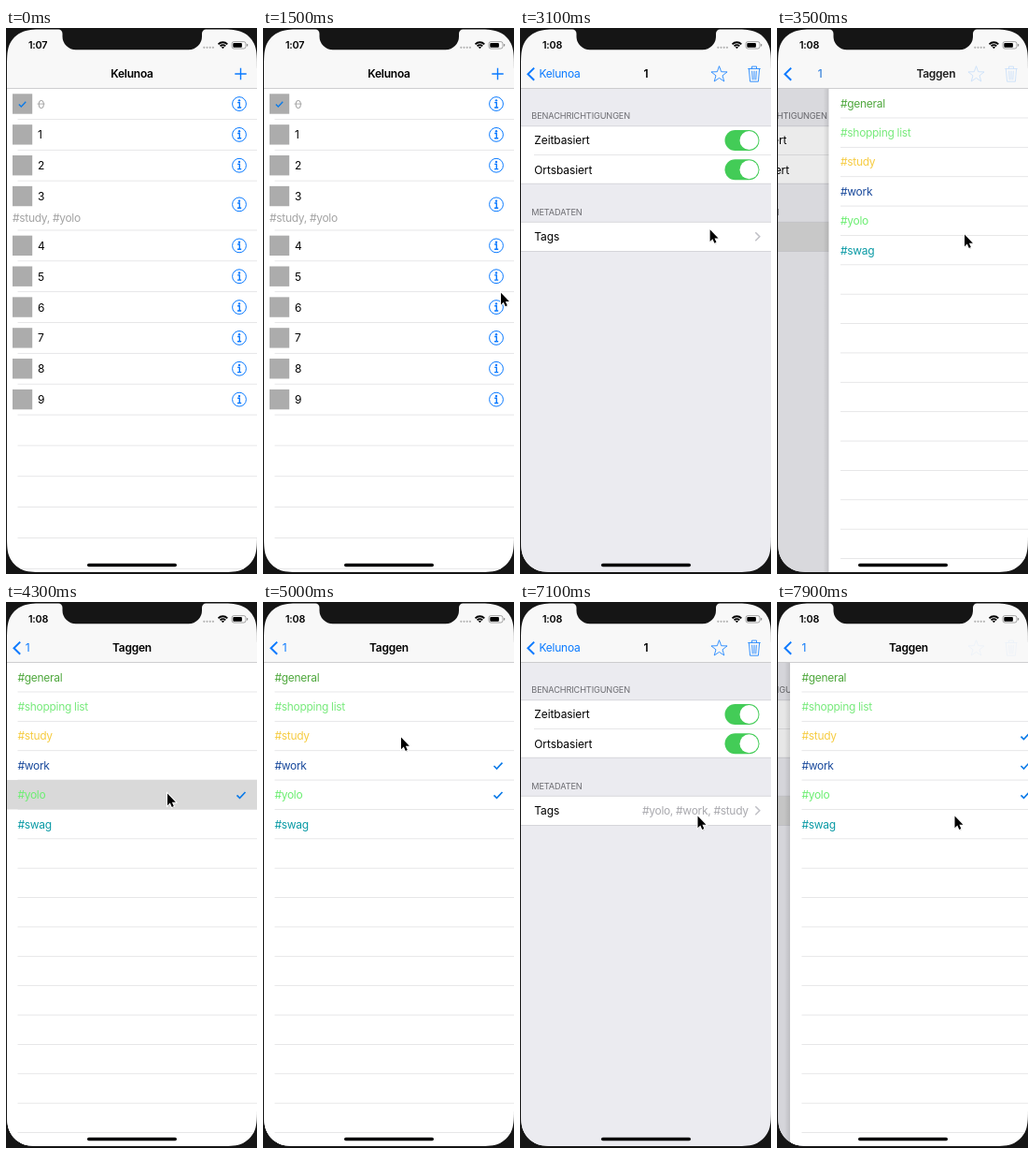
An HTML page that plays this animation: 269 px wide and 583 px high, repeating every 8 s.

```html
<!DOCTYPE html>
<html lang="de">
<head>
<meta charset="utf-8">
<title>Kelunoa</title>
<style>
html, body { margin: 0; width: 100%; height: 100%; overflow: hidden; background: #151515; }
svg { display: block; width: 100vw; height: 100vh; }
text { font: 12px Inter, "Open Sans", sans-serif; letter-spacing: -.25px; white-space: pre; }
.bold { font-weight: 600; }
.mid { text-anchor: middle; }
.end { text-anchor: end; }
.tag { letter-spacing: -.31px; }
.label { letter-spacing: -.1px; }
.head { font-size: 9.2px; letter-spacing: -.14px; fill: #6d6d72; }
.blue { fill: #0a7aff; }
.line { fill: none; stroke: #0a7aff; }
</style>
</head>
<body>
<svg id="stage" viewBox="0 0 269 583"></svg>
<script>
const W = 269, TOP = 64.6, LOOP = 8000, BLUE = '#0a7ae8';
const APP = 'Kelunoa';

const rect = (x, y, w, h, fill, more = '') =>
  `<rect x="${x}" y="${y}" width="${w}" height="${h}" fill="${fill}" ${more}/>`;
const text = (x, y, s, cls = '', more = '') =>
  `<text x="${x}" y="${y}" class="${cls}" ${more}>${s}</text>`;
const rule = (x, y, color = '#e1e1e3') => rect(x, y - .4, W - x, .8, color);
const check = (x, y, size = 1, more = '') =>
  `<path transform="translate(${x} ${y}) scale(${size})" d="M0 .6l3 3 6-6.4" fill="none" stroke="${BLUE}" stroke-width="1.6" ${more}/>`;
const info = y => `<g transform="translate(250 ${y})">
  <circle r="7.4" class="line" stroke-width="1"/>
  <circle cy="-3.7" r="1.2" class="blue"/>
  <path d="M-1.9-1.4H.3V3.8M-2 3.9H2.2" class="line" stroke-width="1.4"/></g>`;

function todoPage() {
  const step = 32.85;
  let out = rect(0, 64, W, 519, '#fff'), y = TOP;
  for (let i = 0; i < 15; i++) {
    const h = i === 3 ? 52.8 : step, c = y + 16.4;
    if (i < 10) {
      out += rect(7, c - 10.7, 21.2, 21.4, '#acacac');
      out += text(34, c + 4.5, i, '', i ? '' : 'fill="#a6a6a6"');
      out += info(y + h / 2 - (i === 3 ? 1.2 : 0));
    }
    if (i === 0) out += check(13.8, c, .83) + rect(33.5, c - .4, 8, .9, '#a6a6a6');
    if (i === 3) out += text(7, c + 27.5, '#study, #yolo', 'tag', 'fill="#a4a4a4"');
    y += h;
    out += rule(12.5, y);
  }
  return out;
}

const toggle = y => rect(219.5, y - 11, 37, 22, '#43cc57', 'rx="11"') +
  `<circle cx="245.5" cy="${y}" r="10" fill="#fff"/>`;

function detailPage() {
  const edge = '#cfcfd4';
  return rect(0, 64, W, 519, '#ebebf0') +
    text(12.3, 97, 'BENACHRICHTIGUNGEN', 'head') + text(12.3, 200, 'METADATEN', 'head') +
    rect(0, 104.8, W, 61.4, '#fff') + rect(0, 207.2, W, 31.2, '#fff') +
    rect(0, 207.2, W, 31.2, '#d9d9d9', 'id="press"') +
    [104.8, 166.2, 207.2, 238.4].map(y => rule(0, y, edge)).join('') + rule(15, 135.5) +
    text(15.3, 124.4, 'Zeitbasiert', 'label') + text(15.3, 155.8, 'Ortsbasiert', 'label') +
    text(15.3, 227, 'Tags', 'label') +
    toggle(120) + toggle(151.3) +
    text(244.7, 227, '#yolo, #work, #study', 'tag end', 'id="picked" fill="#a9a9ae"') +
    '<path d="M252.3 218.2l4.5 4.5-4.5 4.5" fill="none" stroke="#c0c0c6" stroke-width="1.5"/>';
}

const tags = [
  ['general', '#4fa83d'], ['shopping list', '#78ea7c'], ['study', '#f6cc42', 5100],
  ['work', '#1a4a9c', 4600], ['yolo', '#6cee72', 4300], ['swag', '#0a9aa5']
];

function tagPage() {
  const step = 31.37;
  let out = rect(0, 64, W, 519, '#fff');
  for (let i = 0; i < 16; i++) {
    const y = TOP + i * step, c = y + step / 2, tag = tags[i];
    if (tag) {
      if (tag[2]) out += rect(0, y, W, step, '#d9d9d9', `id="hl${i}"`) + check(247.5, c, 1, `id="ck${i}"`);
      out += text(12.5, c + 4.4, '#' + tag[0], 'tag', `fill="${tag[1]}"`);
    }
    out += rule(12.5, y + step);
  }
  return out;
}

function starPath() {
  let d = '';
  for (let i = 0; i < 10; i++) {
    const a = i * Math.PI / 5, r = i % 2 ? 3.7 : 9;
    d += `${i ? 'L' : 'M'}${(213.5 + r * Math.sin(a)).toFixed(2)} ${(49.7 - r * Math.cos(a)).toFixed(2)}`;
  }
  return d + 'Z';
}

const navBar = () => rect(0, 0, W, 64.5, '#f8f8f8') + rule(0, 64.6, '#c4c4c6') +
  '<path id="chev" d="M15.2 42.6L8.5 49.2l6.7 6.6" class="line" stroke-width="2"/>' +
  text(0, 53.4, APP, 'bold mid', 'id="title0"') + text(0, 53.4, APP, 'blue mid', 'id="back0"') +
  text(0, 53.4, '1', 'bold mid', 'id="title1"') + text(0, 53.4, '1', 'blue mid', 'id="back1"') +
  text(0, 53.4, 'Taggen', 'bold mid', 'id="title2"') +
  '<path id="plus" d="M245.3 49h12.4M251.5 42.8v12.4" class="line" stroke-width="1.4"/>' +
  `<g id="tools" class="line" stroke-width=".8"><path d="${starPath()}"/>
   <path d="M244.3 43.5h13.4M248.5 43.3v-2.2h5v2.2M245.4 43.8l1.2 13.4h8.8l1.2-13.4M248.7 45.8l.5 9.5M251 45.8v9.5M253.3 45.8l-.5 9.5"/></g>`;

const arc = r => {
  const k = r * .707;
  return `M${232.4 - k} ${22.2 - k}A${r} ${r} 0 0 1 ${232.4 + k} ${22.2 - k}`;
};

const statusBar = () =>
  text(24, 22.3, '1:07', 'bold', 'id="clock" style="font-size:10.8px"') +
  [212.3, 215.5, 218.7, 221.9].map(x => `<circle cx="${x}" cy="20.8" r="1.1" fill="#b4b4b4"/>`).join('') +
  `<path d="${arc(1.3)}${arc(4)}${arc(6.9)}" fill="none" stroke="#000" stroke-width="1.9"/>` +
  rect(242, 14.6, 15, 7.4, 'none', 'rx="2.2" stroke="#8c8c8c" stroke-width=".8"') +
  rect(243.3, 15.9, 9.6, 4.8, '#000', 'rx="1"') + rect(258, 17, 1.2, 2.6, '#8c8c8c', 'rx=".6"');

// Display outline: four continuous corners, with the notch cut from the top.
function screenPath() {
  const r = 28, left = 1, right = 269, top = 1.6, bottom = 581;
  const bend = [[0, 1.528], [0, 1.088], [0, .868], [.075, .631], [.169, .372],
    [.372, .169], [.631, .075], [.868, 0], [1.088, 0], [1.528, 0]];
  const corner = (x, y, sx, sy, back) => {
    const p = bend.map(([u, v]) => `${(x + sx * u * r).toFixed(2)} ${(y + sy * v * r).toFixed(2)}`);
    if (back) p.reverse();
    return `${p[0]}C${p.slice(1).join(' ')}`;
  };
  const notch = `L56.2 ${top}a4.3 4.3 0 0 1 4.3 4.3v3a14.3 14.3 0 0 0 14.3 14.3H195.7a14.3 14.3 0 0 0 14.3-14.3v-3a4.3 4.3 0 0 1 4.3-4.3`;
  return `M${corner(left, top, 1, 1)}${notch}L${corner(right, top, -1, 1, true)}` +
    `L${corner(right, bottom, -1, -1)}L${corner(left, bottom, 1, -1, true)}Z`;
}

const stage = document.getElementById('stage');
stage.innerHTML = `<defs>
  <clipPath id="screen"><path d="${screenPath()}"/></clipPath>
  <linearGradient id="fade"><stop offset="0" stop-opacity="0"/><stop offset="1" stop-opacity=".11"/></linearGradient>
  </defs>
  <rect width="269" height="583" fill="#151515"/>
  <g clip-path="url(#screen)">
    <g id="page0">${todoPage()}${rect(0, 64, W, 519, '#000', 'id="dim0"')}</g>
    <g id="page1">${rect(-6, 64, 6, 519, 'url(#fade)')}${detailPage()}${rect(0, 64, W, 519, '#000', 'id="dim1"')}</g>
    <g id="page2">${rect(-6, 64, 6, 519, 'url(#fade)')}${tagPage()}</g>
    ${navBar()}${statusBar()}
    ${rect(87, 571.7, 96, 3.5, '#000', 'rx="1.75"')}
  </g>
  <g id="mouse">
    <path d="M1 1.5V14.2l2.8-2.7 2 4.5 2-.9-1.9-4.3h4Z" opacity=".2" transform="translate(.5 1.3)"/>
    <path d="M1 1.5V14.2l2.8-2.7 2 4.5 2-.9-1.9-4.3h4Z" stroke="#fff" stroke-width="1.9" paint-order="stroke"/>
  </g>`;

const el = {};
stage.querySelectorAll('[id]').forEach(n => el[n.id] = n);
const alpha = (id, v) => el[id].setAttribute('opacity', Math.max(0, Math.min(1, v)).toFixed(3));
const move = (id, x, y = 0) => el[id].setAttribute('transform', `translate(${x.toFixed(2)} ${y.toFixed(2)})`);

// Share of the way still to go in a critically damped slide.
function rest(ms) {
  if (ms <= 0) return 1;
  const a = ms * .018, r = (1 + a) * Math.exp(-a);
  return r < .003 ? 0 : r;
}

const path = [
  [400, 257, 331], [500, 254, 341], [1250, 254, 341], [2000, 254, 110.5], [2450, 254, 110.5],
  [3200, 200, 219], [3550, 200, 219], [4100, 172, 203], [4350, 172, 203], [4600, 160, 173],
  [4700, 160, 173], [4950, 147, 143], [5200, 147, 143], [5900, 9.5, 37.5], [6300, 9.5, 37.5],
  [7100, 189.5, 227], [LOOP, 189.5, 227]
];

function mouseAt(t) {
  const i = path.findIndex(p => p[0] > t), a = path[i - 1], b = path[i];
  const k = (t - a[0]) / (b[0] - a[0]), s = k * k * (3 - 2 * k);
  return [a[1] + (b[1] - a[1]) * s, a[2] + (b[2] - a[2]) * s];
}

function draw(t) {
  const p1 = 1 - rest(t - 2247);
  const r2 = t < 5977 ? rest(t - 3336) : t < 7639 ? 1 - rest(t - 5977) : rest(t - 7639);
  const p2 = 1 - r2;

  move('page0', -81 * p1);
  move('page1', W * (1 - p1) - 81 * p2);
  move('page2', W * r2);
  alpha('page1', p1 > 0 ? 1 : 0);
  alpha('page2', p2 > 0 ? 1 : 0);
  alpha('dim0', .11 * p1);
  alpha('dim1', .1 * p2);
  alpha('press', (t >= 3400 && t < 5900) || t >= 7600 ? 1 : 0);
  alpha('picked', t >= 5200 ? 1 : 0);

  const x0 = 135 - 92.5 * p1 - 40 * p2;
  const x1 = 135 + 67 * (1 - p1) - 112 * p2;
  const held = t >= 5900 && t < 6200 ? .4 : 1;
  move('title0', x0);
  move('back0', x0);
  move('title1', x1);
  move('back1', x1);
  move('title2', 135 + 275 * r2 ** 1.3);
  alpha('title0', 1 - p1);
  alpha('back0', p1 * (1 - 2 * p2));
  alpha('title1', p1 * r2);
  alpha('back1', p2 * held);
  alpha('title2', p2 * 1.1);
  alpha('chev', p1 * 1.3 * held);
  alpha('plus', 1 - 2 * p1);
  alpha('tools', p1 * r2);

  tags.forEach(([, , tap], i) => {
    if (!tap) return;
    alpha('hl' + i, t < tap ? 0 : 1 - (t - tap) / 300);
    alpha('ck' + i, t < tap ? 0 : 1);
  });

  el.clock.textContent = t < 2700 ? '1:07' : '1:08';
  alpha('mouse', t < 400 ? 0 : 1);
  if (t >= 400) move('mouse', ...mouseAt(t));
}

const start = performance.now();
function tick() {
  const t = (performance.now() - start) % LOOP;
  draw(Math.floor(t / 100) * 100);
  requestAnimationFrame(tick);
}
tick();
</script>
</body>
</html>
```
